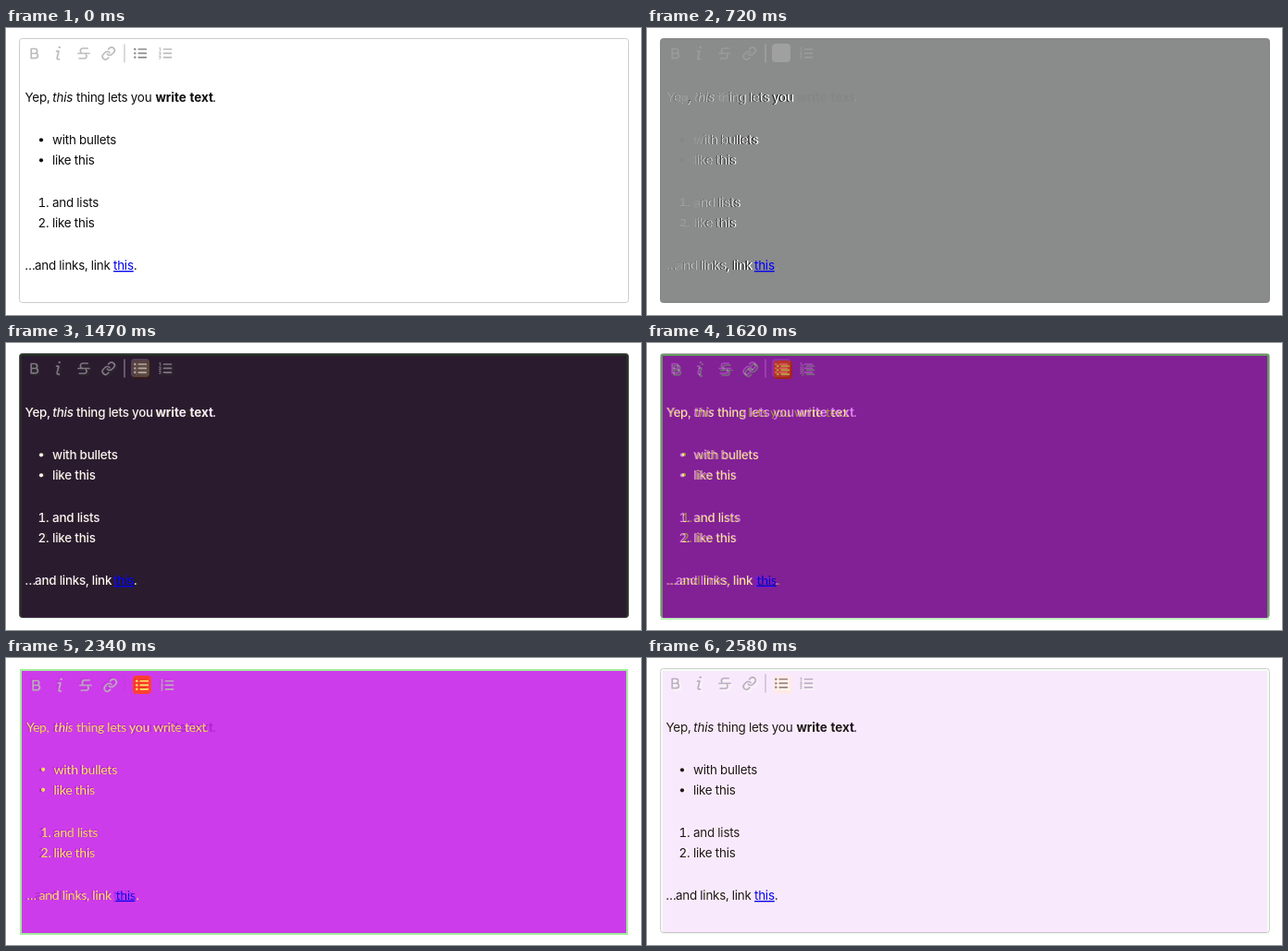
An HTML page for the animation above (2610 ms loop, 686 by 311 pixels).

```html
<!DOCTYPE html>
<html lang="en">
<head>
<meta charset="utf-8">
<title>Editor themes</title>
<style>
  html, body { margin: 0; width: 100%; height: 100%; overflow: hidden; background: #fff; }
  svg { position: absolute; left: 0; top: 0; }
  .sans { font: 13.4px Inter, sans-serif; letter-spacing: -.22px; font-variant-numeric: tabular-nums; }
  .fancy { font: 14px Lato, sans-serif; letter-spacing: -.25px; }
  .sans .strong { font-weight: 700; letter-spacing: .02px; }
  .link { fill: #00e; text-decoration: underline; }
  .icon { fill: none; stroke-width: 1.7; stroke-linecap: round; stroke-linejoin: round; }
</style>
</head>
<body>
<script>
const HOLD = 600, STEP = 30, STEPS = 10, SPAN = HOLD + STEP * (STEPS - 1);

const plain = {
  font: 'sans', weight: 400, baseline: 80, shift: 0,
  frame: 'x="14.5" y="11.5" width="658" height="286" rx="3" stroke-width="1"',
  mark: 38, markY: 121.3, number: 46.4, item: 50,
  intro: [20.5, 50.3, 76, 161.4, 223.2], outro: [20.3, 31, 116, 138]
};
const themes = [
  { ...plain, bg: '#fff', border: '#ccc', text: '#0d0d0d', icon: '#bcbcbc',
    active: '#8c8c8c', box: 'none', divider: '#ccc' },
  { ...plain, weight: 500, bg: '#181a19', border: '#444', text: '#fff', icon: '#7c7c7c',
    active: '#b4b4b4', box: '#444', divider: '#7c7c7c' },
  { font: 'fancy', weight: 400, baseline: 79.5, shift: 2,
    frame: 'x="16" y="13" width="655" height="286" stroke-width="2"',
    mark: 40, markY: 120.8, number: 48.5, item: 51.5,
    intro: [22, 52, 76, 159, 215.4], outro: [22.5, 35.5, 118.5, 140.5],
    bg: '#c826e8', border: '#98ee90', text: '#ffe94f', icon: '#b4a4b4',
    active: '#ffe94f', box: '#ff2a1c', divider: 'none' }
];

const rows = [23, 27.4, 31.8];

function toolbar(t) {
  const bars = x => rows.map(y => `M${x} ${y}h8`).join('');
  return `<g class="icon" stroke="${t.icon}" transform="translate(${t.shift - .3} ${t.shift})">
    <path d="M27.5 22.5h4a2.5 2.5 0 0 1 0 5h-4zm0 5h4.6a2.6 2.6 0 0 1 0 5.2h-4.6z"/>
    <path d="M54.9 25.2h2.3l-1.7 7.1q-.3 1.5 1.1 1.5h1.1"/>
    <circle cx="58" cy="20.9" r="1.2" fill="${t.icon}" stroke="none"/>
    <path d="M88.5 22h-5.3a2.6 2.6 0 0 0-2 4.2M86.8 29a2.4 2.4 0 0 1-1.8 4h-5.5M78.3 27.5h12"/>
    <path transform="translate(103.1 19.6) scale(.66)" stroke-width="2.5"
      d="M10 13a5 5 0 0 0 7.54.54l3-3a5 5 0 0 0-7.07-7.07l-1.72 1.71M14 11a5 5 0 0 0-7.54-.54l-3 3a5 5 0 0 0 7.07 7.07l1.71-1.71"/>
    <path d="M128.3 17.5v20" stroke="${t.divider}" stroke-width="1.4" stroke-linecap="butt"/>
    <rect x="135.3" y="17" width="20" height="20" rx="4" fill="${t.box}" stroke="none"/>
    <path d="${bars(143.6)}" stroke="${t.active}"/>
    ${rows.map(y => `<circle cx="139.6" cy="${y}" r="1.2" fill="${t.active}" stroke="none"/>`).join('')}
    <path d="${bars(170.8)}"/>
    <path stroke-width="1" d="M166 21.8l1-.5v3.4M165.8 26.2h1.6v.9l-1.6 1.5h1.8M165.8 30.4h1.7l-.8 1.3q1 .1.8 1-.3.8-1.7.4"/>
  </g>`;
}

function body(t) {
  const say = (x, dy, s, attrs = '') =>
    `<text x="${x}" y="${t.baseline + dy}" ${attrs}>${s}</text>`;
  const bullet = (dy, s) =>
    `<circle cx="${t.mark}" cy="${t.markY + dy - 46}" r="2.1"/>` + say(t.item, dy, s);
  const numbered = (dy, n, s) =>
    say(t.number, dy, n + '.', 'text-anchor="end"') + say(t.item, dy, s);
  const [yep, it, thing, write, dot] = t.intro;
  const [dots, and, link, end] = t.outro;
  return `<g class="${t.font}" fill="${t.text}" style="font-weight:${t.weight}">` +
    say(yep, 0, 'Yep,') + say(it, 0, 'this', 'font-style="italic"') +
    say(thing, 0, 'thing lets you') +
    say(write, 0, 'write text', 'class="strong"') + say(dot, 0, '.') +
    bullet(46, 'with bullets') + bullet(68, 'like this') +
    numbered(114, 1, 'and lists') + numbered(136, 2, 'like this') +
    say(dots, 182, '…') + say(and, 182, 'and links, link') +
    say(link, 182, 'this', 'class="link"') + say(end, 182, '.') + '</g>';
}

document.body.innerHTML = themes.map(t => `<svg width="686" height="311">
  <rect width="686" height="311" fill="#fff"/>
  <rect ${t.frame} fill="${t.bg}" stroke="${t.border}"/>${toolbar(t)}${body(t)}</svg>`).join('');
const layers = [...document.querySelectorAll('svg')];

// The next theme fades in over the current one in equal steps.
function draw(now) {
  const count = layers.length;
  const time = now % (SPAN * count);
  const current = Math.floor(time / SPAN);
  const since = time % SPAN - HOLD;
  const fade = since < 0 ? 0 : (Math.floor(since / STEP) + 1) / STEPS;
  layers.forEach((layer, i) => {
    const isNext = i === (current + 1) % count;
    layer.style.zIndex = isNext ? 2 : 1;
    layer.style.opacity = i === current ? 1 : isNext ? fade : 0;
  });
}

function tick(now) {
  draw(now);
  requestAnimationFrame(tick);
}
draw(0);
requestAnimationFrame(tick);
</script>
</body>
</html>
```
